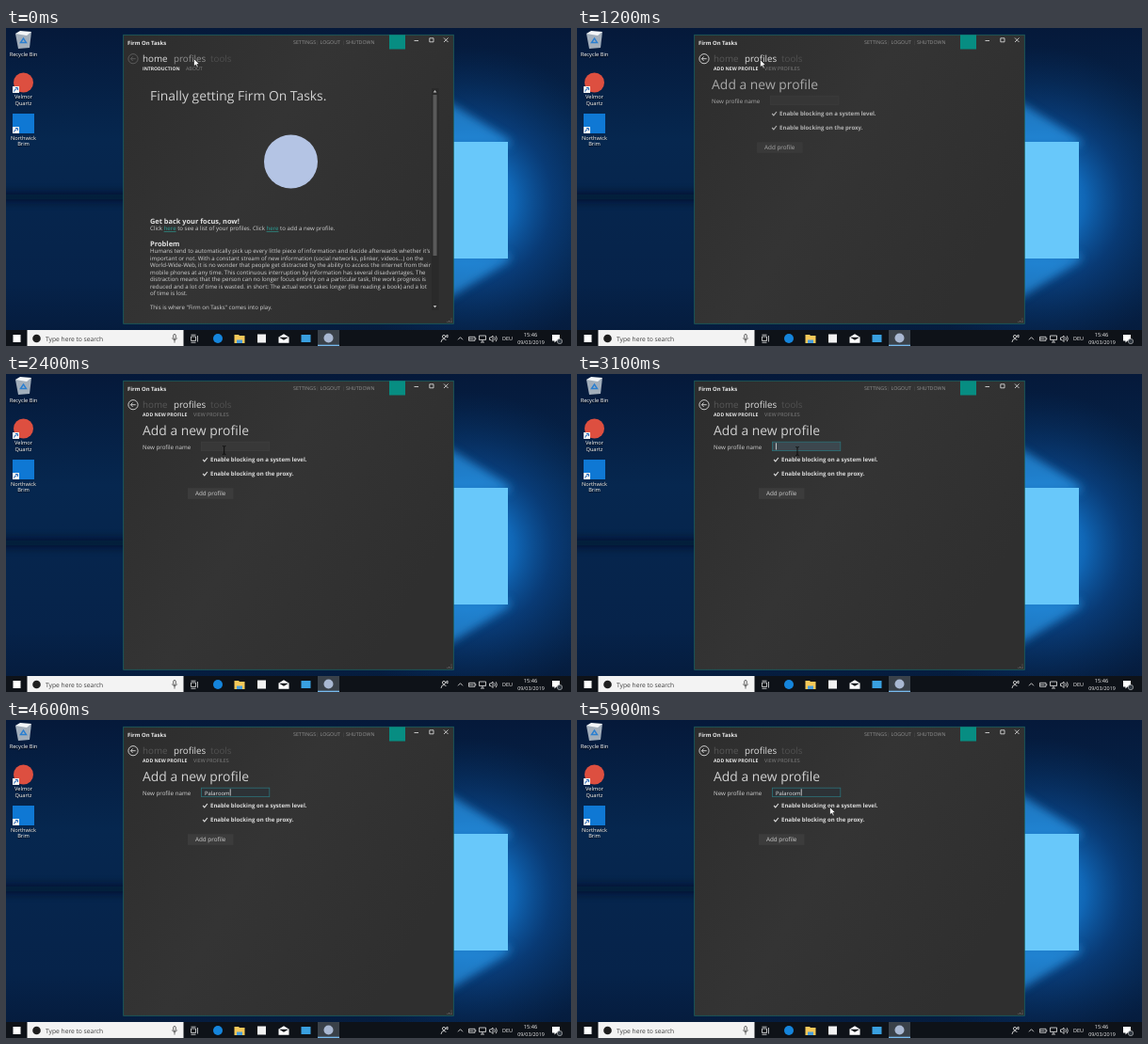
Write an HTML page that moves like this. It is 600 by 338 pixels and loops after 6000 ms.

```html
<!DOCTYPE html>
<html lang="en">
<head>
<meta charset="utf-8">
<title>Add a profile</title>
<style>
  html, body { margin: 0; width: 100%; height: 100%; overflow: hidden; background: #04142c; }
  svg { display: block; width: 100%; height: 100%; }
  text { font-family: 'Open Sans', 'Noto Sans', sans-serif; text-rendering: geometricPrecision; white-space: pre; }
  .b { font-weight: 700; }
  .link { fill: #2aa198; text-decoration: underline; }
  .label text { fill: #fff; text-anchor: middle; font-size: 5.7px; text-shadow: 0 .5px 1px #000; }
  .line { fill: none; stroke: #e8e8e8; stroke-width: .8; }
</style>
</head>
<body>
<svg viewBox="0 0 600 338">
  <defs>
    <linearGradient id="sky" x1="0" y1="0" x2="0" y2="1">
      <stop offset="0" stop-color="#05193a"/>
      <stop offset=".35" stop-color="#06274f"/>
      <stop offset=".8" stop-color="#06234a"/>
      <stop offset="1" stop-color="#051a3a"/>
    </linearGradient>
    <radialGradient id="glow" gradientUnits="userSpaceOnUse" cx="490" cy="184" r="165">
      <stop offset="0" stop-color="#1f96ea"/>
      <stop offset=".3" stop-color="#1272c8" stop-opacity=".85"/>
      <stop offset=".55" stop-color="#0b4c96" stop-opacity=".55"/>
      <stop offset="1" stop-color="#073468" stop-opacity="0"/>
    </radialGradient>
    <linearGradient id="panel" x1="0" y1="0" x2="1" y2=".5">
      <stop offset="0" stop-color="#2d2d2d"/>
      <stop offset=".5" stop-color="#343434"/>
      <stop offset="1" stop-color="#2f2f2f"/>
    </linearGradient>
    <filter id="soft" x="-40%" y="-40%" width="180%" height="180%"><feGaussianBlur stdDeviation="5"/></filter>
    <g id="shortcut">
      <rect width="7" height="7" fill="#f4f4f4"/>
      <path d="M1.6 5.6Q1.8 3 4.4 2.8M3 1.5H5.4V4" fill="none" stroke="#1c62b8" stroke-width="1"/>
    </g>
    <path id="tick" d="M-2.4 0L-.7 1.8L2.4 -2" fill="none" stroke="#e0e0e0" stroke-width="1.1"/>
  </defs>

  <!-- wallpaper -->
  <rect width="600" height="338" fill="url(#sky)"/>
  <rect x="320" width="280" height="338" fill="url(#glow)"/>
  <g filter="url(#soft)">
    <rect x="-20" y="176" width="160" height="7" fill="#020f22" opacity=".8"/>
    <path d="M440 60L535 119V126H440Z" fill="#2d9df0" opacity=".65"/>
    <path d="M440 306L535 247V240H440Z" fill="#2d9df0" opacity=".65"/>
  </g>
  <rect x="409" y="121" width="124" height="124" fill="#68c8fa"/>

  <!-- desktop -->
  <path d="M10 6L27 4L25 21L13 22Z" fill="#c9d3db" opacity=".8"/>
  <path d="M10 6L15 3L27 4L22 8Z" fill="#f3f6f8"/>
  <path d="M15.500 15.500L18.500 11L21.500 15.500Z" fill="none" stroke="#2b7fd0" stroke-width="1.400"/>
  <circle cx="18.500" cy="58" r="10.500" fill="#dd4f40"/>
  <use href="#shortcut" x="7" y="62"/>
  <rect x="7" y="91" width="23" height="21" fill="#0f78d4"/>
  <use href="#shortcut" x="7" y="105"/>
  <g class="label" id="labels"></g>

  <!-- window -->
  <rect x="124.700" y="7.300" width="350.600" height="307" fill="url(#panel)" stroke="#1d625f" stroke-width=".8"/>
  <rect x="407" y="7.300" width="17" height="15.200" fill="#078d82"/>
  <path class="line" d="M433.500 13.500H438M449.800 10.800H454V14.800H449.800ZM465 10.500L469.500 15M469.500 10.500L465 15"/>
  <path d="M473 308.500V313M470.500 311V313M468.300 312.300H474" stroke="#777" stroke-width=".8" stroke-dasharray="1 1"/>
  <g id="back" fill="none" stroke-width=".9">
    <circle cx="135" cy="32.700" r="5.100"/>
    <path d="M137.700 32.700H132.500M134.600 30.500L132.400 32.700L134.600 34.900"/>
  </g>
  <g id="nav"></g>
  <g id="homeSub"></g>
  <g id="profSub"></g>

  <g id="home">
    <circle cx="302.500" cy="142" r="28.500" fill="#b4c4e4"/>
    <rect x="452" y="64" width="7.500" height="236" fill="#2a2a2a"/>
    <rect x="453.500" y="71" width="4" height="171" fill="#5a5a5a"/>
    <path d="M453.700 68.500L455.500 66L457.300 68.500ZM453.700 295L455.500 297.500L457.300 295Z" fill="#bbb"/>
  </g>

  <g id="add">
    <rect id="field" x="207.500" y="72.200" width="72.300" height="9.400" stroke-width=".8"/>
    <rect id="caret" y="73.300" width=".8" height="7.200" fill="#e4e4e4"/>
    <use href="#tick" x="211.500" y="91"/>
    <use href="#tick" x="211.500" y="106"/>
    <rect x="193" y="121.300" width="48.500" height="11.500" fill="#3c3c3c"/>
  </g>

  <!-- taskbar -->
  <rect y="321" width="600" height="17" fill="#0e1218"/>
  <rect x="7.500" y="326" width="8" height="8" fill="#fff"/>
  <rect x="22.500" y="321" width="166" height="17" fill="#f3f3f3"/>
  <circle cx="32.500" cy="330" r="4.300" fill="#1f1f1f"/>
  <g fill="none" stroke="#444" stroke-width=".8">
    <rect x="177.700" y="325.500" width="2.600" height="5" rx="1.300"/>
    <path d="M176.300 329.500Q179 334 181.700 329.500M179 332V334.500"/>
  </g>
  <path class="line" d="M196.500 328H201.500V332.500H196.500ZM203.500 327V333.500M196.500 326.200H201.500M196.500 334.300H201.500"/>
  <circle cx="225" cy="330" r="5" fill="#1585dc"/>
  <path d="M242.500 326H247L248 327H253.500V335H242.500Z" fill="#f5c95a"/>
  <path d="M245 331.500H251V335H245Z" fill="#4a9fdd"/>
  <rect x="267" y="325.500" width="9" height="9" fill="#f2f2f2"/>
  <path d="M289.500 328.500L295 325.300L300.500 328.500V334.700H289.500Z" fill="#fff"/>
  <path d="M290 328.700H300L295 331.700Z" fill="#0e1218"/>
  <rect x="313.500" y="326" width="10" height="8" fill="#39a0e0"/>
  <rect x="331" y="321" width="23" height="17" fill="#3a4149"/>
  <rect x="331" y="336.700" width="23" height="1.300" fill="#76b9ed"/>
  <circle cx="342.500" cy="329.500" r="5" fill="#a9b8d2"/>
  <g class="line">
    <circle cx="465" cy="328" r="1.600"/>
    <path d="M462 334Q462.300 330.500 465 330.500Q466.800 330.500 467.300 332M467 327.500L469 326V329Z"/>
    <path d="M480 331.300L482.500 328.700L485 331.300"/>
    <path d="M491.500 328.300H498V332.300H491.500ZM498.800 329.500V331M492 330.300H496.500" />
    <path d="M502.500 327H509.500V331.500H502.500ZM506 331.500V334M504 334H508"/>
    <path d="M513.500 329H515L517 327V333.500L515 331.500H513.500ZM518.700 328.500Q520 330.200 518.700 332M520.300 327.300Q522.300 330.200 520.300 333.200"/>
  </g>
  <path d="M580 326H588V332.500H584.500L582.500 334.500V332.500H580Z" fill="#fff"/>
  <circle cx="588" cy="333" r="2.700" fill="#333b44" stroke="#ddd" stroke-width=".5"/>
  <g id="bar"></g>

  <path id="arrow" d="M0 0V8.300L2 6.500L3.400 9.500L4.700 8.900L3.400 6H6Z" fill="#fff" stroke="#111" stroke-width=".6"/>
  <path id="beam" d="M-1.700 -4.500Q0 -4.500 0 -3.500Q0 -4.500 1.700 -4.500M0 -3.500V3.500M-1.700 4.500Q0 4.500 0 3.500Q0 4.500 1.700 4.500" fill="none" stroke="#0a0a0a" stroke-width=".9"/>
</svg>
<script>
const LOOP = 6000, NAME = 'Palaroom';
const CLICK_TAB = 450, SWAP = 1020, FOCUS = 2600, TYPE = 3500, KEY = 130, BLINK = 530;
const SHOW_MOUSE = 5000;
const $ = id => document.getElementById(id);

function put(group, x, y, size, str, fill = '#d0d0d0', cls = '') {
  const el = document.createElementNS('http://www.w3.org/2000/svg', 'text');
  el.setAttribute('x', x);
  el.setAttribute('y', y);
  el.setAttribute('fill', fill);
  el.setAttribute('class', cls);
  el.style.fontSize = size + 'px';
  el.innerHTML = str;
  $(group).append(el);
  return el;
}

[['Recycle Bin', 30], ['Velmor', 75.2], ['Quartz', 81.7], ['Northwick', 118.5], ['Brim', 125]]
  .forEach(([str, y]) => put('labels', 18.5, y, 5.7, str));

put('nav', 129, 17.7, 5.9, 'Firm On Tasks', '#e8e8e8', 'b');
[[305, 'SETTINGS'], [333.5, 'LOGOUT'], [361, 'SHUTDOWN']].forEach(([x, s]) => put('nav', x, 17.4, 5.3, s, '#929292'));
[329.5, 357.5].forEach(x => put('nav', x, 17.2, 4.8, '|', '#555'));
const tabs = [[145, 'home'], [178, 'profiles'], [217, 'tools']].map(([x, s]) => put('nav', x, 35.7, 9.8, s));

put('homeSub', 145, 45.1, 5.05, 'INTRODUCTION', '#e4e4e4', 'b');
put('homeSub', 191, 45.1, 5.3, 'ABOUT', '#808080');
put('profSub', 145, 45.1, 5.2, 'ADD NEW PROFILE', '#e4e4e4', 'b');
put('profSub', 199, 45.1, 5.35, 'VIEW PROFILES', '#808080');

const link = '<tspan class="link">here</tspan>';
put('home', 153, 77.4, 13.9, 'Finally getting Firm On Tasks.');
put('home', 153, 207.8, 7.4, 'Get back your focus, now!', '#e2e2e2', 'b');
put('home', 153, 215.3, 6.1, `Click ${link} to see a list of your profiles. Click ${link} to add a new profile.`);
put('home', 153, 231.5, 7.5, 'Problem', '#e2e2e2', 'b');
[
  "Humans tend to automatically pick up every little piece of information and decide afterwards whether it's",
  'important or not. With a constant stream of new information (social networks, plinker, videos...) on the',
  'World-Wide-Web, it is no wonder that people get distracted by the ability to access the internet from their',
  'mobile phones at any time. This continuous interruption by information has several disadvantages. The',
  'distraction means that the person can no longer focus entirely on a particular task, the work progress is',
  'reduced and a lot of time is wasted. in short: The actual work takes longer (like reading a book) and a lot',
  'of time is lost.', '',
  'This is where "Firm on Tasks" comes into play.'
].forEach((s, i) => put('home', 153, 239.3 + i * 7.48, 6.1, s));

put('add', 145, 65.3, 13.9, 'Add a new profile');
put('add', 145, 79.5, 6.2, 'New profile name');
put('add', 217, 93.1, 6.05, 'Enable blocking on a system level.', '#dcdcdc', 'b');
put('add', 217, 108.1, 6.05, 'Enable blocking on the proxy.', '#dcdcdc', 'b');
put('add', 201, 129.1, 6.3, 'Add profile');
const typed = put('add', 211, 79.5, 5.9, '', '#e6e6e6');

put('bar', 42, 332.6, 6.7, 'Type here to search', '#3c3c3c');
put('bar', 527, 332.2, 5.5, 'DEU', '#f0f0f0');
put('bar', 557, 327.5, 5.7, '15:46', '#f0f0f0').setAttribute('text-anchor', 'middle');
put('bar', 557.5, 335.7, 5.4, '09/03/2019', '#f0f0f0').setAttribute('text-anchor', 'middle');

// pointer stops: time, x, y
const path = [[0, 199.5, 32.5], [350, 194.5, 33.5], [1350, 194.5, 33.5], [1800, 207.5, 74],
  [2150, 222, 77], [2500, 234, 82], [5000, 234, 82], [5600, 268.5, 92.5], [LOOP, 268.5, 92.5]];
const clamp = v => Math.min(1, Math.max(0, v));

function pointer(t) {
  const i = path.findIndex(p => p[0] > t);
  const [a, b] = [path[i - 1], path[i]];
  const k = (t - a[0]) / (b[0] - a[0]), e = k * k * (3 - 2 * k);
  return [a[1] + (b[1] - a[1]) * e, a[2] + (b[2] - a[2]) * e];
}

function show(el, on) { el.style.visibility = on ? 'visible' : 'hidden'; }

function draw(t) {
  const onProfiles = t >= CLICK_TAB, swapped = t >= SWAP, focused = t >= FOCUS;
  const colors = onProfiles ? ['#585858', '#dedede', '#505050'] : ['#dedede', '#929292', '#4e4e4e'];
  tabs.forEach((el, i) => el.setAttribute('fill', colors[i]));
  show($('homeSub'), !onProfiles);
  show($('profSub'), onProfiles);
  $('back').setAttribute('stroke', swapped ? '#dcdcdc' : '#606060');

  $('home').style.display = swapped ? 'none' : '';
  const k = clamp((t - SWAP) / 380), rest = (1 - k) ** 2;
  $('add').style.display = swapped ? '' : 'none';
  $('add').setAttribute('opacity', 1 - rest * .9);
  $('add').setAttribute('transform', `translate(${-7 * rest} 0)`);

  const [x, y] = pointer(t);
  const overField = swapped && x > 208 && x < 280 && y > 72 && y < 82.5;
  const hidden = t >= TYPE && t < SHOW_MOUSE;
  for (const id of ['arrow', 'beam']) {
    $(id).setAttribute('transform', `translate(${x} ${y})`);
    show($(id), !hidden && (id === 'beam') === overField);
  }

  const count = t < TYPE ? 0 : Math.min(NAME.length, Math.floor((t - TYPE) / KEY) + 1);
  typed.textContent = NAME.slice(0, count);
  const hover = focused && overField && !hidden;
  $('field').setAttribute('fill', hover ? '#3c474e' : focused ? '#2d3236' : '#383838');
  $('field').setAttribute('stroke', focused ? '#2c7178' : '#3e3e3e');
  const since = count ? t - TYPE - KEY * (count - 1) : t - FOCUS;
  $('caret').setAttribute('x', 211 + (count ? typed.getComputedTextLength() + .3 : 0));
  $('caret').style.opacity = focused && Math.floor(since / BLINK) % 2 === 0 ? 1 : 0;
}

const start = performance.now();
function tick() {
  draw((performance.now() - start) % LOOP);
  requestAnimationFrame(tick);
}
tick();
</script>
</body>
</html>
```
